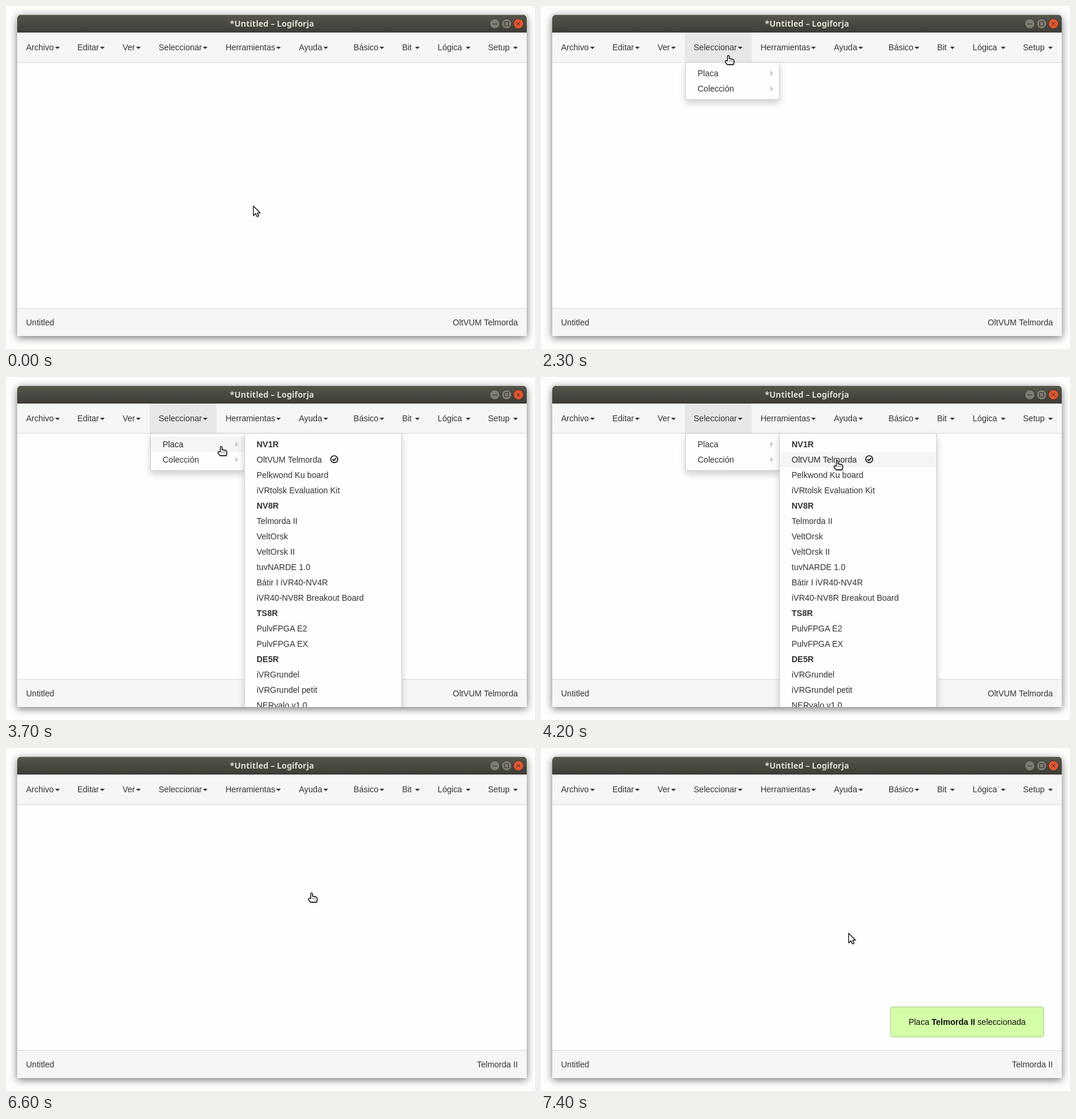
Recreate the animation shown at these times as an HTML page. Size 895 px wide and 581 px high, loop 8 s.

```html
<!DOCTYPE html>
<html lang="es">
<head>
<meta charset="utf-8">
<title>Menú</title>
<style>
html, body { margin: 0; width: 100%; height: 100%; overflow: hidden; background: #fefefe; }
body { position: relative; font: 14px/20px "Liberation Sans", Arial, sans-serif; color: #333; cursor: default; }
body * { box-sizing: border-box; white-space: pre; }
.abs, #win, .bar, .menu, #toast, #cursor { position: absolute; }
#win { left: 19px; top: 15px; width: 862px; height: 544px; border-radius: 6px 6px 0 0;
  box-shadow: 0 3px 14px rgba(0,0,0,.55); }
#clip { position: absolute; inset: 0; overflow: hidden; background: #fefefe; border-radius: 6px 6px 0 0; }
.bar { left: 0; right: 0; display: flex; justify-content: space-between; background: #f5f7f5; }
#head { top: 0; height: 30px; background: linear-gradient(#55564b, #3d3c37); box-shadow: inset 0 1px #66665b;
  justify-content: center; font: bold 14px/30px "Noto Sans", "Open Sans", sans-serif; color: #dfdbd2; }
#nav { top: 30px; height: 51px; border-bottom: 1px solid #d6d9d8; }
#nav div { display: flex; }
#nav span { padding: 15px; height: 50px; }
#nav span::after { content: ""; display: inline-block; margin-left: 2px; vertical-align: middle;
  border: 4px solid transparent; border-top-color: currentColor; border-bottom: 0; }
#nav .open { background: #e7e8e6; }
#foot { top: 497px; height: 47px; border-top: 1px solid #d5d8d7; padding: 13px 15px; }
.menu { top: 80px; padding: 5px 0; background: #fefefe; border: 1px solid rgba(0,0,0,.2);
  box-shadow: 0 6px 12px rgba(0,0,0,.175); }
.menu div { position: relative; height: 26px; padding: 3px 20px; }
.menu .hot { background: #f5f5f5; color: #262626; }
#main { left: 225px; width: 160px; border-radius: 0 0 4px 4px; }
#main div::after { content: ""; position: absolute; right: 10px; top: 8px;
  border: 5px solid transparent; border-left-color: #ccc; border-right: 0; }
#sub { left: 384px; width: 267px; }
#sub svg { position: absolute; left: 144px; top: 5px; }
#toast { left: 572px; top: 423px; width: 260px; height: 52px; padding: 15px 0; text-align: center; color: #111;
  background: #d4fda8; border: 1px solid #a6ca8a; border-radius: 4px; }
#cursor { left: 0; top: 0; overflow: visible; filter: drop-shadow(1px 1px 1px rgba(0,0,0,.25)); }
</style>
</head>
<body>
<div id="win"><div id="clip">
  <div class="bar" id="head">*Untitled – Logiforja</div>
  <svg class="abs" style="left:798px;top:5px" width="62" height="20" fill="none" stroke="#35342f">
    <g fill="#7d7c73"><circle cx="10" cy="10" r="8.5"/><circle cx="30" cy="10" r="8.5"/><circle cx="50" cy="10" r="8.5" fill="#e4552f"/></g>
    <path d="M6 10.5h8M26.5 6.5h7v7h-7zM47 7l6 6m0-6l-6 6"/>
  </svg>
  <div class="bar" id="nav"><div><span>Archivo</span><span>Editar</span><span>Ver</span><span id="pick">Seleccionar</span><span>Herramientas</span><span>Ayuda</span></div><div><span>Básico</span><span>Bit </span><span>Lógica </span><span>Setup </span></div></div>
  <div class="bar" id="foot"><span>Untitled</span><span id="board"></span></div>
  <div class="menu" id="main"><div>Placa</div><div>Colección</div></div>
  <div class="menu" id="sub"></div>
  <div id="toast">Placa <b>Telmorda II</b> seleccionada</div>
</div></div>
<svg id="cursor" width="18" height="21" fill="#fff" stroke="#000" stroke-linejoin="round">
  <path id="arrow" stroke-width="1.2" d="M.5 .8V17L4.4 13.4 6.8 18.8 9.4 17.7 7.2 12.5H12Z"/>
  <g id="hand" transform="translate(-4 -1)">
    <path stroke-width="1.3" d="M4.6 10V2.2Q4.8.7 6 .7T7.5 2.2V6L14 7.5Q15.4 8 15.4 9.5V13L14.2 16.2H4L.8 12Q.4 9.4 2.2 9.4Z"/>
    <path stroke-width="1" d="M7.5 9.5v1.5M10 9.5v1.5M12.5 9.5v1.5M4.5 16.4H14"/>
  </g>
</svg>
<script>
const $ = id => document.getElementById(id);
const OLD = 'OltVUM Telmorda', NEW = 'Telmorda II';
// A leading '#' marks a group heading
const boards = ['#NV1R', OLD, 'Pelkwond Ku board', 'iVRtolsk Evaluation Kit', '#NV8R', NEW,
  'VeltOrsk', 'VeltOrsk II', 'tuvNARDE 1.0', 'Bátir I iVR40-NV4R', 'iVR40-NV8R Breakout Board',
  '#TS8R', 'PulvFPGA E2', 'PulvFPGA EX', '#DE5R', 'iVRGrundel', 'iVRGrundel petit', 'NERvalo v1.0'];
const check = '<svg width="15" height="15" fill="none" stroke="#262626" stroke-width="1.8">' +
  '<circle cx="7.3" cy="7.3" r="5.9"/><path stroke-width="2" d="M4.3 7.2l2.3 2.3 4-4.2"/></svg>';
$('sub').innerHTML = boards.map(b =>
  `<div>${b[0] === '#' ? `<b>${b.slice(1)}</b>` : b}${b === OLD ? check : ''}</div>`).join('');
const mainRows = [...$('main').children], subRows = [...$('sub').children];

// Pointer path: time, x, y
const path = [[0, 418, 338], [1200, 418, 338], [1300, 414, 335], [1400, 369, 274], [1500, 369, 274],
  [1900, 311, 133], [2000, 311, 133], [2400, 316, 68], [2700, 316, 68], [3200, 316, 111],
  [3300, 316, 111], [3500, 334, 113], [3600, 334, 113], [4200, 499, 142], [4500, 513, 204],
  [4600, 513, 204], [5000, 515, 246], [7200, 515, 246], [7400, 520, 313], [8000, 520, 313]];

function pointer(t) {
  const i = path.findIndex(p => p[0] > t), [t0, x0, y0] = path[i - 1], [t1, x1, y1] = path[i];
  const k = (t - t0) / (t1 - t0);
  return [Math.round(x0 + (x1 - x0) * k), Math.round(y0 + (y1 - y0) * k)];
}

const slide = $('toast').animate(
  [{ transform: 'translateX(600px)', opacity: 0 }, { transform: 'none', opacity: 1 }],
  { duration: 500, easing: 'cubic-bezier(.175,.885,.32,1.275)', fill: 'both' });
slide.pause();

const show = (id, on) => $(id).style.visibility = on ? 'visible' : 'hidden';

function draw(t) {
  const [x, y] = pointer(t);
  const open = t >= 2300 && t < 6600, nested = open && t >= 3400;
  const rows = x < 404 ? mainRows : nested ? subRows : [];
  const row = open && y >= 101 ? rows[Math.floor((y - 101) / 26)] : null;
  const hot = row && !row.querySelector('b') ? row : null;
  for (const r of [...mainRows, ...subRows]) r.classList.toggle('hot', r === hot);
  $('pick').classList.toggle('open', open);
  show('main', open);
  show('sub', nested);
  const hand = hot || (open && y < 95) || (t >= 6600 && t < 6700);
  show('hand', hand);
  show('arrow', !hand);
  $('cursor').style.transform = `translate(${x}px,${y}px)`;
  $('board').textContent = t < 6600 ? OLD : NEW;
  slide.currentTime = Math.max(0, Math.min(500, t - 6600));
}

const start = performance.now();
function tick() {
  const t = (performance.now() - start) % 8000;
  draw(Math.floor(t / 100) * 100);
  requestAnimationFrame(tick);
}
tick();
</script>
</body>
</html>
```
